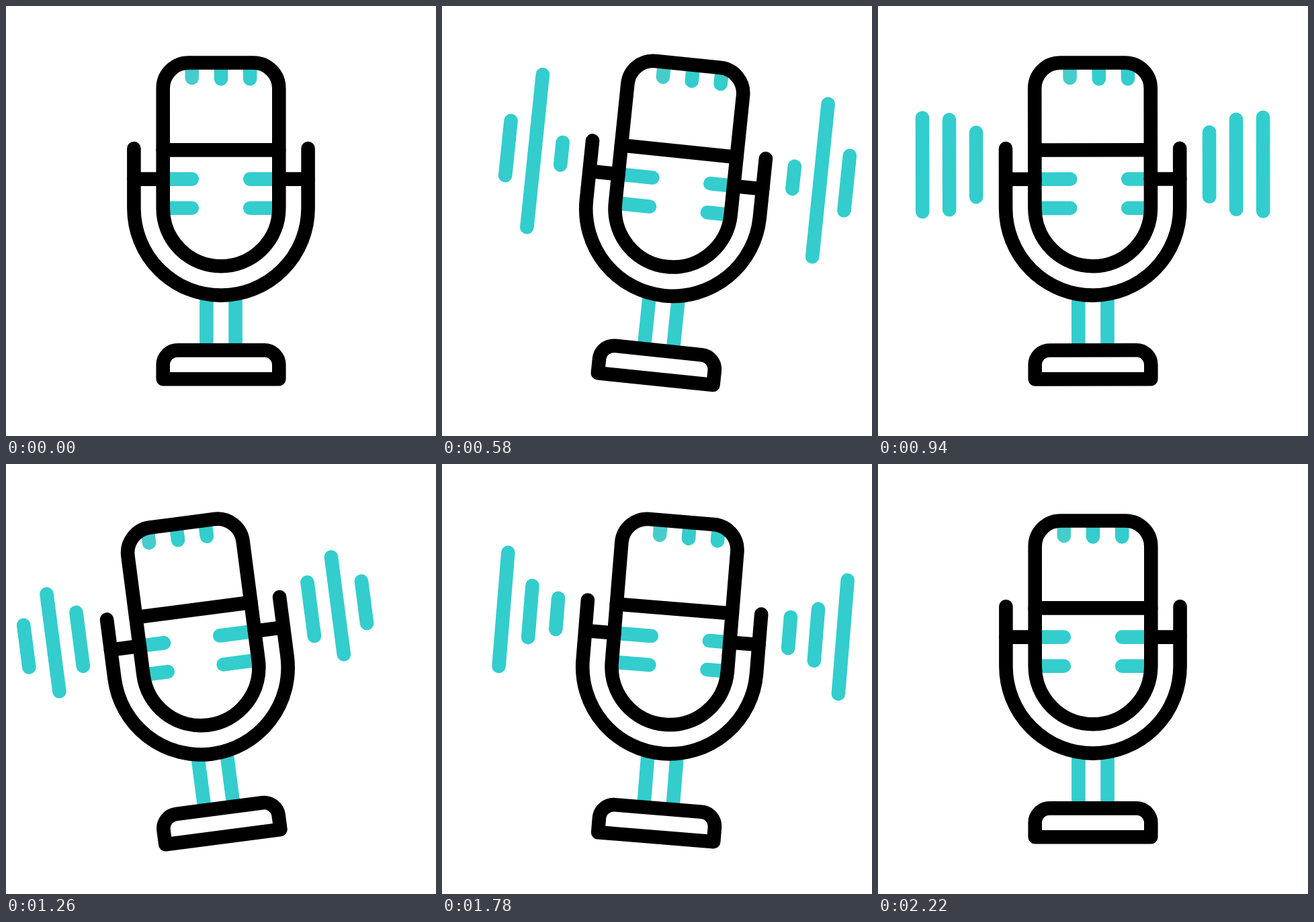
Write an HTML page that moves like this. It is 640 px wide and 640 px high and loops after 2400 ms.

```html
<!DOCTYPE html>
<html lang="en">
<head>
<meta charset="utf-8">
<title>Swinging microphone</title>
<style>
  html, body { margin: 0; width: 100%; height: 100%; overflow: hidden; background: #fff; }
  svg { display: block; width: 100vw; height: 100vh; }
  path { fill: none; stroke-width: 20.6; }
  .teal { stroke: #33cdcd; }
  .pale { stroke: #47cccc; }
  .ink { stroke: #000; }
  .round { stroke-linecap: round; stroke-linejoin: round; }
</style>
</head>
<body>
<svg viewBox="0 0 640 640">
  <defs>
    <path id="shell" d="M233.7 122.5a38 38 0 0 1 38-38H368.3a38 38 0 0 1 38 38V301a86.3 86.3 0 0 1-172.6 0Z"/>
    <clipPath id="inside"><use href="#shell"/></clipPath>
  </defs>
  <g id="mic">
    <g id="bars" class="teal round"></g>
    <path class="teal" d="M298.4 430V508M341.6 430V508"/>
    <g class="teal round" clip-path="url(#inside)">
      <path id="leftLines" d="M200 257.6H276.8M200 300.8H276.8"/>
      <g id="accents">
        <path class="pale" d="M276.8 60V107"/>
        <path d="M320 60V108.5M363.2 60V108.5M440 257.6H363.2M440 300.8H363.2"/>
      </g>
    </g>
    <g class="ink round">
      <use href="#shell"/>
      <path d="M233.7 214.4H406.3M190.4 257.6H233.7M406.3 257.6H449.6"/>
      <path d="M190.4 212V301a129.6 129.6 0 0 0 259.2 0V212"/>
      <path d="M233.7 555.3V534a21.6 21.6 0 0 1 21.6-21.6H384.7a21.6 21.6 0 0 1 21.6 21.6V555.3Z"/>
    </g>
  </g>
</svg>
<script>
const LOOP = 2400, STEP = 20, START = 200, END = 2200;
const CENTER = 320, BAR_Y = 236, BAR_GAP = 40;

const byId = id => document.getElementById(id);
const mic = byId('mic'), accents = byId('accents'), leftLines = byId('leftLines');
const barGroup = byId('bars');

// Keys are [time, value]; every motion starts and ends at zero.
const fromRest = keys => [[START, 0], ...keys, [END, 0]];
const evenly = (...values) => fromRest(values.map((value, i) =>
  [START + (END - START) * (i + 1) / (values.length + 1), value]));

const tilt = evenly(6.9, -7.93, 5);
const slide = leftReach => fromRest([[820, 12.2], [1378, -leftReach], [1790, 12.6]]);
const accentSlide = slide(12), lineSlide = slide(9);

// Lengths of the mirrored sound bars, from the inner pair outwards.
const bars = [
  evenly(30, 98, 80, 88, 38),
  evenly(234, 132, 146, 148, 63),
  evenly(78, 152, 52, 184, 167)
].map((lengths, i) => {
  const path = document.createElementNS('http://www.w3.org/2000/svg', 'path');
  barGroup.append(path);
  return { lengths, path, offset: 173.5 + i * BAR_GAP };
});

const smooth = u => u * u * (3 - 2 * u);

function valueAt(keys, t) {
  const next = keys.findIndex(([time]) => time > t);
  if (next < 1) return 0;
  const [t0, v0] = keys[next - 1], [t1, v1] = keys[next];
  return v0 + (v1 - v0) * smooth((t - t0) / (t1 - t0));
}

function draw(time) {
  const t = Math.floor((time % LOOP) / STEP) * STEP;
  mic.setAttribute('transform', `rotate(${valueAt(tilt, t)} ${CENTER} 533)`);
  accents.setAttribute('transform', `translate(${valueAt(accentSlide, t)} 0)`);
  leftLines.setAttribute('transform', `translate(${valueAt(lineSlide, t)} 0)`);
  barGroup.setAttribute('visibility', t > START && t < END ? 'visible' : 'hidden');
  for (const { lengths, path, offset } of bars) {
    const length = valueAt(lengths, t);
    const bar = x => `M${x} ${BAR_Y - length / 2}v${length}`;
    path.setAttribute('d', bar(CENTER - offset) + bar(CENTER + offset));
  }
}

const origin = performance.now();
function tick() {
  draw(performance.now() - origin);
  requestAnimationFrame(tick);
}
tick();
</script>
</body>
</html>
```
